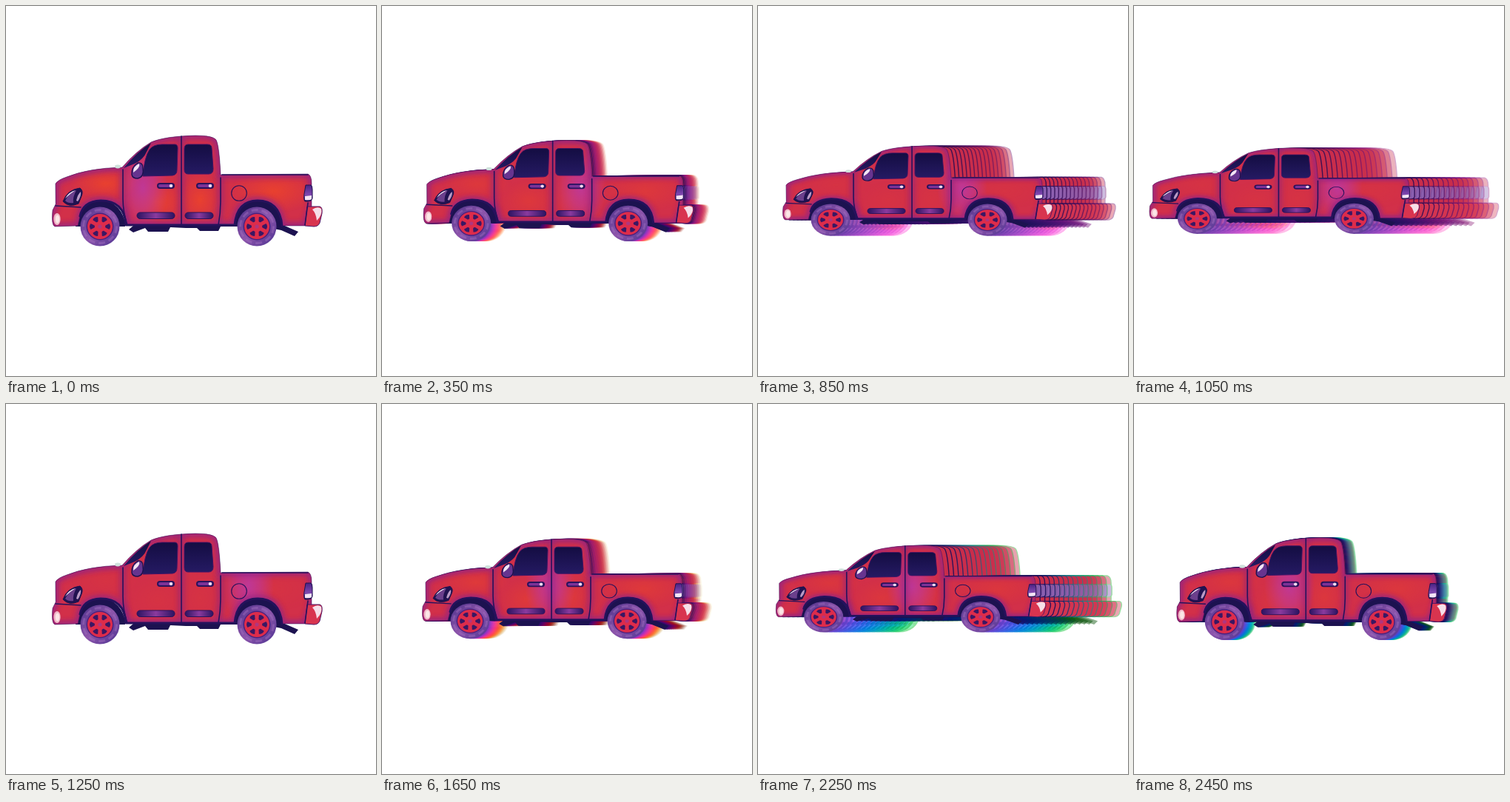
Recreate the animation shown at these times as an HTML page. Size 500 by 500 pixels, loop 2.5 s.

```html
<!DOCTYPE html>
<html lang="en">
<head>
<meta charset="utf-8">
<title>Pickup truck</title>
<style>
  html, body { margin: 0; width: 100%; height: 100%; overflow: hidden; background: #fff; }
  svg { display: block; width: 100%; height: 100%; }
  .line { fill: none; stroke: #25125c; stroke-width: 1.6; stroke-linecap: round; stroke-linejoin: round; }
</style>
</head>
<body>
<svg viewBox="0 0 500 500">
  <defs>
    <path id="shell" d="M67 240Q70 235 82 231Q112 219 157 218Q176 196 196 184Q214 176 256 175Q280 175 284 181Q288 188 290 228L408 227Q413 229 413 240L413 272L404 297L373 297Q370 263 340 263Q312 263 309 296L162 296Q160 263 128 263Q104 264 100 284L97 297L66 298Q61 296 63 276L67 268Z"/>
    <path id="rearBumper" d="M407 271H424Q428 272 427 280L424 293Q422 298 416 298L404 297Z"/>
    <path id="rearLamp" d="M405 242H412Q414 243 414 248V260Q413 264 408 264H404Q402 262 403 254Z"/>
    <clipPath id="inside"><use href="#shell"/></clipPath>
    <filter id="soft" x="-20%" y="-20%" width="140%" height="140%"><feGaussianBlur stdDeviation="3.5"/></filter>
    <radialGradient id="purple">
      <stop offset="0" stop-color="#b63ab8" stop-opacity=".7"/><stop offset=".45" stop-color="#b63ab8" stop-opacity=".45"/>
      <stop offset="1" stop-color="#b63ab8" stop-opacity="0"/>
    </radialGradient>
    <radialGradient id="orange">
      <stop offset="0" stop-color="#ee4529"/><stop offset="1" stop-color="#ee4529" stop-opacity="0"/>
    </radialGradient>
    <linearGradient id="glass" x1="0" y1="0" x2="0" y2="1">
      <stop offset="0" stop-color="#140d42"/><stop offset="1" stop-color="#251a63"/>
    </linearGradient>
    <linearGradient id="slot">
      <stop offset="0" stop-color="#2b1461"/><stop offset=".5" stop-color="#8a3a9e"/><stop offset="1" stop-color="#2b1461"/>
    </linearGradient>
    <linearGradient id="tyre" x1="0" y1="0" x2="1" y2="1">
      <stop offset="0" stop-color="#4a3089"/><stop offset=".5" stop-color="#8d55ab"/><stop offset="1" stop-color="#4b3291"/>
    </linearGradient>
    <linearGradient id="lamp" x1="0" y1="0" x2="0" y2="1">
      <stop offset="0" stop-color="#4a2384"/><stop offset=".6" stop-color="#8148b0"/><stop offset="1" stop-color="#20104e"/>
    </linearGradient>

    <g id="wheel">
      <circle r="26.5" fill="url(#tyre)"/>
      <circle r="22.500" fill="none" stroke="#a873c4" stroke-width="3" stroke-dasharray="9 5" opacity=".4"/>
      <circle r="18.500" fill="#482180"/>
      <circle r="17" fill="#dd2c4b"/>
      <g id="holes" fill="#3a1763"></g>
      <circle r="2.6" fill="#b1367e"/>
    </g>

    <g id="under" fill="#1c1250">
      <path d="M94 298A33.500 36 0 0 1 161 298ZM305 298A34 36 0 0 1 373 298ZM150 288H315V298H290L287 304H262L258 300H243L222 299L219 305H192L188 300L172 306L166 302L172 297H150Z"/>
      <path d="M360 290L372 295L395 305L390 311L372 303L362 301Z"/>
    </g>

    <g id="wheels">
      <use href="#wheel" x="127" y="298"/>
      <use href="#wheel" x="339" y="298"/>
    </g>

    <g id="ghostLow">
      <use href="#under"/>
      <use href="#wheels"/>
    </g>
    <g id="ghostTop" stroke-width="1.400">
      <use href="#shell" fill="#c92d4b"/>
      <use href="#rearBumper" fill="#d43551"/>
      <use href="#rearLamp" fill="#8a62b4"/>
    </g>

    <g id="handle">
      <rect width="24" height="8" rx="4" fill="#28125c"/>
      <rect x="2" y="2" width="17" height="4" rx="2" fill="#7d3297"/>
      <circle cx="19" cy="4" r="2.3" fill="#f3dcf0"/>
    </g>
  </defs>

  <g id="stage">
    <g id="trail"></g>
    <g id="truck">
      <use href="#under"/>
      <use href="#shell" fill="#d23049"/>
      <g clip-path="url(#inside)">
        <g id="warm"></g>
        <g id="cool"></g>
        <use href="#shell" fill="none" stroke="#8f2388" stroke-width="9" opacity=".8" filter="url(#soft)"/>
        <path d="M158 222V262L164 296M237 176V296M290 230V264L287 296" fill="none" stroke="#8c2380" stroke-width="8" opacity=".6" filter="url(#soft)"/>
        <path d="M68 270H101" stroke="#7c2083" stroke-width="4" filter="url(#soft)"/>
      </g>
      <use href="#shell" class="line" style="stroke-width:.8" opacity=".6"/>
      <use href="#rearBumper" fill="#d8344f" stroke="#4a1667" stroke-width="1"/>

      <path d="M159 219Q178 196 196 185L190 197Q186 207 174 213Z" fill="url(#glass)"/>
      <path d="M185 230Q187 204 194 194Q199 187 211 187H228Q232 187 232 192L231 222Q231 228 225 229Z" fill="url(#glass)" stroke="#401365"/>
      <path d="M246 187H272Q278 187 278 192L280 220Q280 227 274 227H246Q241 227 241 221V193Q241 187 246 187Z" fill="url(#glass)" stroke="#401365"/>
      <path class="line" d="M158 221V260Q158 279 164 296M237 176V296M292 228H408M290 232V264Q290 280 287 296M67 270L101 272M404 296L408 266"/>
      <path class="line" d="M100 284Q104 264 128 263Q160 263 162 296H309Q312 263 340 263Q370 263 373 297" style="stroke-width:3"/>
      <circle class="line" cx="315" cy="253" r="10.3" style="stroke-width:1.1"/>

      <use href="#handle" x="204" y="239"/>
      <use href="#handle" x="257" y="239"/>
      <rect x="177" y="279" width="51" height="8.5" rx="4.2" fill="url(#slot)" stroke="#28125c"/>
      <rect x="242" y="279" width="38" height="8.5" rx="4.2" fill="url(#slot)" stroke="#28125c"/>

      <path d="M170 228Q169 218 178 212Q185 211 185 219Q187 231 178 233Q171 233 170 228Z" fill="#67348f" stroke="#1c1250" stroke-width="1.4"/>
      <path d="M172 225Q171 217 180 213Q182 218 172 225Z" fill="#f3e7f5"/>
      <ellipse cx="151" cy="217" rx="4" ry="2.4" fill="#cfe2dc"/>

      <path d="M77 264Q83 248 100 246Q105 250 102 257L98 267Q85 273 77 264Z" fill="#211250" stroke="#1c1250"/>
      <path d="M80 263Q86 251 95 249Q90 258 91 266Q84 267 80 263Z" fill="#6b3f8c"/>
      <path d="M95 263Q97 254 101 251Q102 257 97 264Z" fill="#b99bc6"/>
      <path d="M80 260Q85 251 94 249Q86 254 80 260Z" fill="#f4e5f6"/>
      <ellipse cx="69" cy="288" rx="4.6" ry="8" fill="#f1b9c9"/>
      <ellipse cx="69.500" cy="288" rx="2.7" ry="5.500" fill="#fbe6e6"/>
      <use href="#rearLamp" fill="url(#lamp)" stroke="#1c1250"/>
      <path d="M404 257L413 256V261Q411 263 404 262Z" fill="#f4e5f6"/>
      <path d="M414 275Q421 270 426 274Q428 282 420 290Q419 280 414 275Z" fill="#f6dfe9"/>
      <use href="#wheels"/>
    </g>
  </g>
</svg>
<script>
const NS = 'http://www.w3.org/2000/svg';
const LOOP = 2500, CYCLE = 1250, PULL = 1100, STEP = 50, COPIES = 16;
const $ = id => document.getElementById(id);

function add(parent, tag, attrs) {
  const el = document.createElementNS(NS, tag);
  for (const k in attrs) el.setAttribute(k, attrs[k]);
  return parent.appendChild(el);
}

for (let i = 0; i < 6; i++) {
  add($('holes'), 'path', {
    d: 'M-4 -12.500Q0 -15.500 4 -12.500L1.500 -7.500Q0 -6.500 -1.500 -7.500Z',
    transform: `rotate(${i * 60 + 30})`
  });
}

const blob = (parent, fill, cx, cy, rx, ry) =>
  add($(parent), 'ellipse', { cx, cy, rx, ry, fill: `url(#${fill})` });

[[135, 240, 48, 22], [205, 265, 40, 32], [262, 262, 28, 38], [362, 250, 60, 30]]
  .forEach(b => blob('warm', 'orange', ...b));
const glow = blob('cool', 'purple', 0, 246, 34, 58);

const ghosts = [];
for (let i = COPIES; i > 0; i--) {
  const el = add($('trail'), 'g', {});
  ghosts.push({
    u: i / COPIES,
    el,
    low: add(el, 'use', { href: '#ghostLow' }),
    top: add(el, 'use', { href: '#ghostTop' })
  });
}

// Moods of the loop: time, glow x, warmth, trail hue turn, tail opacity, tip lightness
const moods = [
  [0, 185, .8, 90, .15, 50],
  [350, 275, .4, 120, .12, 55],
  [850, 305, .15, 40, .42, 24],
  [1250, 328, .15, 60, .3, 40],
  [1650, 235, .45, 150, .12, 60],
  [2000, 285, .3, -150, .55, 35],
  [2450, 215, .35, -120, .35, 45],
  [2500, 185, .8, 90, .15, 50]
];

function moodAt(t) {
  const i = moods.findIndex(m => m[0] > t);
  const a = moods[i - 1], b = moods[i];
  const k = (t - a[0]) / (b[0] - a[0]);
  return a.map((v, j) => v + (b[j] - v) * k);
}

// Slow pull forward, quick snap back
function pull(t) {
  return t <= PULL
    ? Math.pow(t / PULL, 1.71)
    : Math.pow((CYCLE - t) / (CYCLE - PULL), 2.05);
}

function draw(time) {
  const t = Math.floor((time % LOOP) / STEP) * STEP;
  const q = pull(t % CYCLE);
  const lead = 45 * q;
  const lag = 66 * Math.sin(q * Math.PI / 2);
  const squash = 1 - 17.4 * Math.sqrt(q) / 75;
  const [, glowX, warmth, hue, tail, light] = moodAt(t);

  $('stage').setAttribute('transform', `translate(0 ${250 * (1 - squash)}) scale(1 ${squash})`);
  $('truck').setAttribute('transform', `translate(${-lead} 0)`);
  glow.setAttribute('cx', glowX);
  $('warm').setAttribute('opacity', warmth);

  $('trail').style.display = q > 0 ? '' : 'none';
  for (const { u, el, low, top } of ghosts) {
    el.setAttribute('transform', `translate(${(lead + lag) * u - lead} 0)`);
    el.setAttribute('opacity', tail + (.9 - tail) * (1 - u));
    low.style.filter = `hue-rotate(${hue * u}deg) saturate(${1 + Math.abs(hue) / 300}) brightness(${1 + .7 * u})`;
    top.setAttribute('stroke', `hsl(${(620 + hue * u) % 360}, 75%, ${18 + (light - 18) * u}%)`);
  }
}

let start;
function tick(now) {
  if (start === undefined) start = now;
  draw(now - start);
  requestAnimationFrame(tick);
}
draw(0);
requestAnimationFrame(tick);
</script>
</body>
</html>
```
